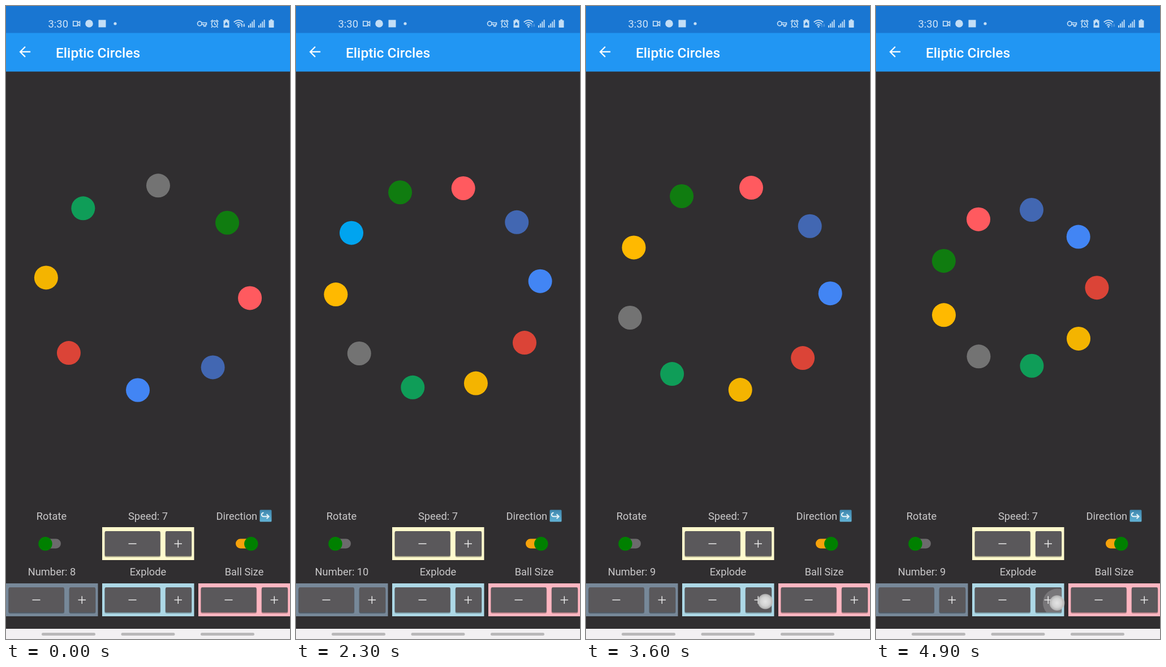
Recreate the animation shown at these times as an HTML page. Size 502 by 1115 pixels, loop 5000 ms.

```html
<!DOCTYPE html>
<html lang="en">
<head>
<meta charset="utf-8">
<title>Eliptic Circles</title>
<style>
  html, body { margin: 0; width: 100%; height: 100%; overflow: hidden; background: #302e30; }
  svg { display: block; width: 100vw; height: 100vh; }
  text { font-family: Roboto, sans-serif; font-size: 18.3px; fill: #c9c8c9; }
  .mid { text-anchor: middle; }
  .line { fill: none; stroke: #c3def6; stroke-width: 1.7; }
</style>
</head>
<body>
<svg viewBox="0 0 502 1115" xmlns="http://www.w3.org/2000/svg">
  <defs>
    <radialGradient id="dot">
      <stop offset="0" stop-color="#e4e4e4"/>
      <stop offset=".6" stop-color="#d2d2d2"/>
      <stop offset=".85" stop-color="#bcbcbc"/>
      <stop offset="1" stop-color="#c8c8c8" stop-opacity=".6"/>
    </radialGradient>
    <linearGradient id="sky" x2="0" y2="1">
      <stop offset="0" stop-color="#3f86ad"/>
      <stop offset="1" stop-color="#62b3d6"/>
    </linearGradient>
    <clipPath id="clip"><rect id="clipBox" y="1024" height="44" rx="2"/></clipPath>
  </defs>
  <rect width="502" height="1115" fill="#302e30"/>
  <rect width="502" height="48" fill="#1976d2"/>
  <rect y="47.5" width="502" height="68" fill="#2196f3"/>

  <!-- status bar -->
  <text x="74.5" y="37.6" style="font-size:18.4px;fill:#d0e4f8">3:30</text>
  <g fill="#c3def6">
    <path class="line" d="M118.8 27h7.6v8.2h-7.6zM126.5 30l4-2.6v7.4l-4-2.6"/>
    <circle cx="147" cy="31" r="6.8"/>
    <rect x="163.500" y="24.500" width="13" height="13"/>
    <circle cx="193" cy="31" r="2.6"/>
    <g class="line">
      <circle cx="342.300" cy="31" r="3.800"/>
      <path d="M346 29.500h8.400v3.200h-1.600v3h-3v-3h-3.800"/>
      <circle cx="368.700" cy="31.500" r="5.300"/>
      <path d="M362 27.500l3.600-3M375.400 27.500l-3.600-3M368.700 28.500v3.400l2.500 1.600M364.500 36l-1.500 2M373 36l1.500 2"/>
    </g>
    <path d="M387 23.500h5v1.700h2.500v12.800h-10v-12.800h2.500z"/>
    <path d="M387 32.500l2.500-4 2.500 4zM387.300 34h4.500" fill="#1976d2" stroke="#1976d2"/>
    <g class="line">
      <path d="M402.700 28.500q8.300-7 16.600 0M405.300 31.400q5.700-4.700 11.400 0M408 34.200q3-2.400 6 0"/>
    </g>
    <circle cx="411" cy="36.500" r="1.500"/>
    <path id="data" d="M416 37v-3.500h-1.200l2-2.500 2 2.500h-1.200v3.500zM420 31v3.500h-1.200l2 2.500 2-2.500h-1.200v-3.500z"/>
    <g id="bars"></g>
    <path d="M467 23.500h4v1.800h2.500v12.700h-9v-12.700h2.500z"/>
  </g>

  <!-- app bar -->
  <path d="M43.200 80.700H25.500M34 71.800l-8.900 8.900 8.900 8.900" fill="none" stroke="#fff" stroke-width="2.3"/>
  <text x="88" y="90.500" style="font-size:24.500px;font-weight:500;fill:#fff">Eliptic Circles</text>

  <g id="balls"></g>

  <!-- controls -->
  <text class="mid" x="80.500" y="904.500">Rotate</text>
  <text class="mid" x="251" y="904.500">Speed: 7</text>
  <text x="371.500" y="904.500">Direction</text>
  <rect x="448.500" y="887.500" width="21" height="21" rx="1.500" fill="url(#sky)"/>
  <path d="M456 894.500h-.5a3.200 3.200 0 0 0 0 6.400h9M461.200 897l4 3.900-4 3.900" transform="translate(-.5 -1.700)" fill="none" stroke="#e6f1f7" stroke-width="2"/>
  <rect x="62" y="938.500" width="35" height="17" rx="8.500" fill="#6c6a6c"/>
  <circle cx="69.500" cy="947.300" r="12.200" fill="#008000"/>
  <rect x="406" y="938.500" width="35" height="17" rx="8.500" fill="#f6a20b"/>
  <circle cx="433.300" cy="947.300" r="12.200" fill="#008000"/>
  <text class="mid" x="81" y="1003.300" id="count"></text>
  <text class="mid" x="251" y="1003.300">Explode</text>
  <text class="mid" x="421" y="1003.300">Ball Size</text>
  <g id="steppers"></g>

  <g id="touch">
    <circle id="ripple" clip-path="url(#clip)" fill="#fff"/>
    <circle id="finger" r="13.500" fill="url(#dot)"/>
  </g>

  <!-- navigation bar -->
  <rect y="1097" width="502" height="18" fill="#f2f0f2"/>
  <g fill="#b9b8b9">
    <rect x="63" y="1104" width="95" height="5" rx="2.500"/>
    <rect x="203.500" y="1104" width="95" height="5" rx="2.500"/>
    <rect x="344" y="1104" width="95" height="5" rx="2.500"/>
  </g>
</svg>
<script>
const LOOP = 5000, STEP = 100, CX = 251, CY = 496.4;
const $ = id => document.getElementById(id);

function add(parent, tag, attrs) {
  const el = document.createElementNS('http://www.w3.org/2000/svg', tag);
  set(el, attrs);
  parent.appendChild(el);
  return el;
}
function set(el, attrs) {
  for (const k in attrs) el.setAttribute(k, attrs[k]);
}

function stepper(x, y, color) {
  const g = add($('steppers'), 'g', { transform: `translate(${x} ${y})` });
  add(g, 'rect', { width: 162.5, height: 58, fill: color });
  for (const [bx, w] of [[4.7, 98], [112, 46]]) {
    add(g, 'rect', { x: bx - .5, y: 8, width: w + 1, height: 45, rx: 3, fill: '#000', opacity: .3 });
    add(g, 'rect', { x: bx, y: 7, width: w, height: 44, rx: 2, fill: '#5a585b' });
  }
  add(g, 'path', { d: 'M46.500 29.300h14M127.500 29.300h13.500M134.300 22.500v13.500', stroke: '#e8e8e8', 'stroke-width': 1.5 });
}
stepper(170, 918, '#fffacd');
stepper(0, 1017, '#778899');
stepper(170, 1017, '#add8e6');
stepper(340, 1017, '#ffb6c1');

for (const x of [428, 446])
  for (let i = 0; i < 4; i++)
    add($('bars'), 'rect', { x: x + i * 3.2, y: 34 - i * 3.3, width: 2, height: 4 + i * 3.3 });

const balls = ['#107c10', '#ff5a5f', '#4267b2', '#4285f4', '#db4437',
  '#f4b400', '#0f9d58', '#737373', '#ffb900', '#00a4ef']
  .map(fill => add($('balls'), 'circle', { r: 21, fill }));

// Each press: finger down and up times, place, and the ring it leaves behind.
const START = { n: 8, angle: 320.7, r: 181 };
const presses = [
  { down: 1200, up: 1400, x: 122.5, y: 1054.5, n: 9, angle: 284.5, r: 181 },
  { down: 1700, up: 1900, x: 122.5, y: 1053, n: 10, angle: 248.3, r: 181 },
  { down: 2700, up: 2900, x: 54, y: 1050, n: 9, angle: 243.1, r: 181 },
  { down: 3500, up: 3800, x: 317, y: 1049, n: 9, angle: 228.7, r: 167.2 },
  { down: 4100, up: 4300, x: 317.5, y: 1046.5, n: 9, angle: 214.3, r: 153.3 },
  { down: 4700, up: 4900, x: 320, y: 1051.5, n: 9, angle: 199.9, r: 139.5 }
];
const FADE = 300;

function drawTouch(t) {
  const p = presses.find(p => t >= p.down && t < p.up + FADE);
  $('touch').style.display = p ? '' : 'none';
  if (!p) return;
  const fade = Math.min(1, 1 - (t - p.up) / FADE);
  const left = p.x < 110 ? 4.7 : p.x < 170 ? 112 : 282;
  set($('clipBox'), { x: left, width: left < 100 ? 98 : 46 });
  set($('finger'), { cx: p.x, cy: p.y, opacity: .45 + .55 * fade });
  set($('ripple'), {
    cx: p.x, cy: p.y,
    r: Math.min(40, (t - p.down) / 8),
    opacity: .1 + .08 * fade
  });
}

function draw(time) {
  const t = Math.floor(time % LOOP / STEP) * STEP;
  const ring = presses.filter(p => t >= p.up).pop() || START;
  balls.forEach((ball, i) => {
    const a = (ring.angle + i * 360 / ring.n) * Math.PI / 180;
    set(ball, { cx: CX + ring.r * Math.cos(a), cy: CY + ring.r * Math.sin(a) });
    ball.style.display = i < ring.n ? '' : 'none';
  });
  $('count').textContent = 'Number: ' + ring.n;
  set($('data'), { opacity: t < 100 ? 1 : .35 });
  drawTouch(t);
}

const begin = performance.now();
function tick() {
  draw(performance.now() - begin);
  requestAnimationFrame(tick);
}
tick();
</script>
</body>
</html>
```
